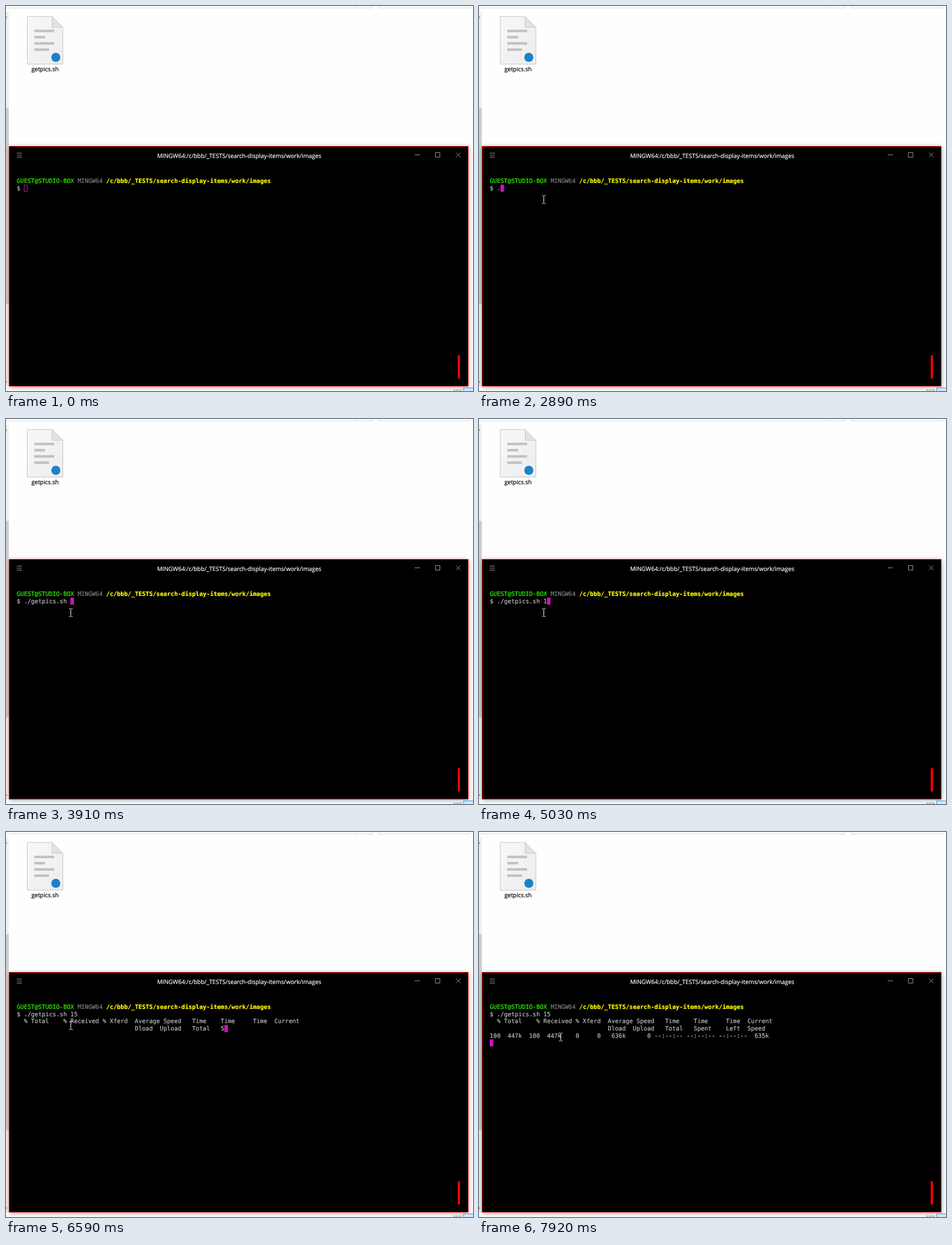
Recreate the animation shown at these times as an HTML page. Size 825 px wide and 679 px high, loop 8000 ms.

```html
<!DOCTYPE html>
<html lang="en">
<head>
<meta charset="utf-8">
<title>Terminal session</title>
<style>
  html, body { margin: 0; width: 100%; height: 100%; overflow: hidden; background: #fefefe; }
  svg { display: block; }
  text { white-space: pre; text-rendering: geometricPrecision; }
  text, tspan { fill: currentColor; stroke: currentColor; stroke-width: .2px; }
  .ui { font: 10.4px "Open Sans", sans-serif; text-anchor: middle; }
  .mono { font: 10.5px "DejaVu Sans Mono", monospace; color: #bfbfbf; }
</style>
</head>
<body>
<svg width="825" height="679" viewBox="0 0 825 679">
  <defs>
    <linearGradient id="paper" x2="1" y2="1">
      <stop stop-color="#f8f8f8"/><stop offset="1" stop-color="#ececec"/>
    </linearGradient>
    <filter id="blur" x="-5%" y="-5%" width="110%" height="110%"><feGaussianBlur stdDeviation="4"/></filter>
  </defs>

  <!-- file browser -->
  <rect width="825" height="679" fill="#fefefe"/>
  <path d="M0 3.5H646.5V0M619.5 0V3M658.5 0V3.5H819.5V0" fill="none" stroke="#d9d9d9"/>
  <rect y="10" width="5" height="661" fill="#f0f0f0"/>
  <rect y="180" width="5" height="346" fill="#cdcdcd"/>
  <path d="M0 18l2 2.5H0zM0 662.5h2L0 665z" fill="#505050"/>
  <path d="M37.5 18.5H81.5L100.5 37.5V102.5H37.5z" fill="url(#paper)" stroke="#c6c6c6"/>
  <path d="M81.5 18.5V37.5H100.5z" fill="#e2e2e2" stroke="#c6c6c6"/>
  <path d="M50 44H85M50 55H69M50 66H85M50 77H76" stroke="#c1c1c1" stroke-width="4.5"/>
  <circle cx="88" cy="90.5" r="8" fill="#1b81c8"/>
  <text class="ui" x="69" y="115" color="#000">getpics.sh</text>

  <!-- terminal window -->
  <rect x="6" y="249" width="811" height="423" opacity=".4" filter="url(#blur)"/>
  <path d="M790 677.5h4M795 677.5h4M800 677.5h5" stroke="#777"/>
  <rect x="808.5" y="673.5" width="20" height="10" fill="#cce8ff" stroke="#3c92c8"/>
  <rect x="5.5" y="247.5" width="811" height="423" stroke="#f00a0a"/>
  <path d="M19 259.5H28M19 263H28M19 266.5H28M722 262.5H731M758.5 258.5H766.5V266.5H758.5zM795 258.5L803 266.5M803 258.5L795 266.5"
        fill="none" stroke="#999"/>
  <text class="ui" x="412" y="268" color="#fff">MINGW64:/c/bbb/_TESTS/search-display-items/work/images</text>
  <rect x="798" y="616" width="4" height="41" fill="#f00"/>

  <text class="mono" x="19" y="312.2"><tspan color="#3f0">GUEST@STUDIO-BOX</tspan> <tspan color="#808080">MINGW64</tspan> <tspan color="#ff0" font-weight="bold">/c/bbb/_TESTS/search-display-items/work/images</tspan></text>
  <g id="rows"></g>
  <rect id="caret" width="5.3" height="11.3" stroke="#cc12be"/>
  <path id="mouse" d="M-3-7H-1L0-6L1-7H3M0-6V6M-3 7H-1L0 6L1 7H3" fill="none" stroke="#fff"/>
</svg>
<script>
const LOOP = 8000, LEFT = 19, CHAR = 6.322, LINE = 12.63;
const rowsGroup = document.getElementById('rows');
const caret = document.getElementById('caret');
const mouse = document.getElementById('mouse');
const clamp = (value, max) => Math.min(Math.max(value, 0), max);

const prompt = '$ ', script = './getpics.sh ', count = '15';
const clock = '--:--:-- '.repeat(3);
const header =
  '  % Total    % Received % Xferd  Average Speed   Time    Time     Time  Current\n' +
  ' '.repeat(33) + 'Dload  Upload   Total   Spent    Left  Speed\n';
const waiting = '  0     0    0     0    0     0      0      0 ' + clock + '    0';
const done = '100  447k  100  447k    0     0   636k      0 ' + clock + ' 635k';

// The first keys come ever faster, then the name is completed at once.
function typed(t) {
  if (t < 2890) return '';
  if (t < 3910) return script.slice(0, 1 + clamp(Math.floor(4 * ((t - 2890) / 870) ** (4 / 3)), 4));
  return script + count.slice(0, clamp(1 + Math.floor((t - 5030) / 690), 2));
}

function output(t) {
  if (t < 6590) return '';
  if (t < 6740) return '\n' + header.slice(0, header.indexOf('Spent') + 1);
  if (t < 7200) return '\n' + header + waiting;
  return '\n' + header + done + (t < 7320 ? '' : '\n');
}

// The pointer glides in with an ease-out, seen in five jumps.
function pointer(t) {
  if (t < 590) return [-50, -50];
  const u = clamp(Math.floor((t - 590) / 142) / 5, 1);
  const eased = 1 - (1 - u) ** 2;
  const nudge = t < 7920 ? 0 : 1;
  return [327.5 - 213 * eased + 30 * nudge, 622.5 - 281 * eased + 20 * nudge];
}

const rows = [1, 2, 3, 4].map(i => {
  const row = document.createElementNS('http://www.w3.org/2000/svg', 'text');
  row.setAttribute('class', 'mono');
  row.setAttribute('x', LEFT);
  row.setAttribute('y', 312.2 + i * LINE);
  return rowsGroup.appendChild(row);
});

function draw(t) {
  const lines = (prompt + typed(t) + output(t)).split('\n');
  rows.forEach((row, i) => row.textContent = lines[i] || '');

  const last = lines.length - 1;
  caret.setAttribute('x', LEFT + lines[last].length * CHAR + 0.5);
  caret.setAttribute('y', 315.7 + last * LINE);
  caret.setAttribute('fill', t < 1610 ? 'none' : '#cc12be');

  mouse.setAttribute('transform', `translate(${pointer(t)})`);
}

const start = performance.now();
function tick() {
  draw((performance.now() - start) % LOOP);
  requestAnimationFrame(tick);
}
tick();
</script>
</body>
</html>
```
